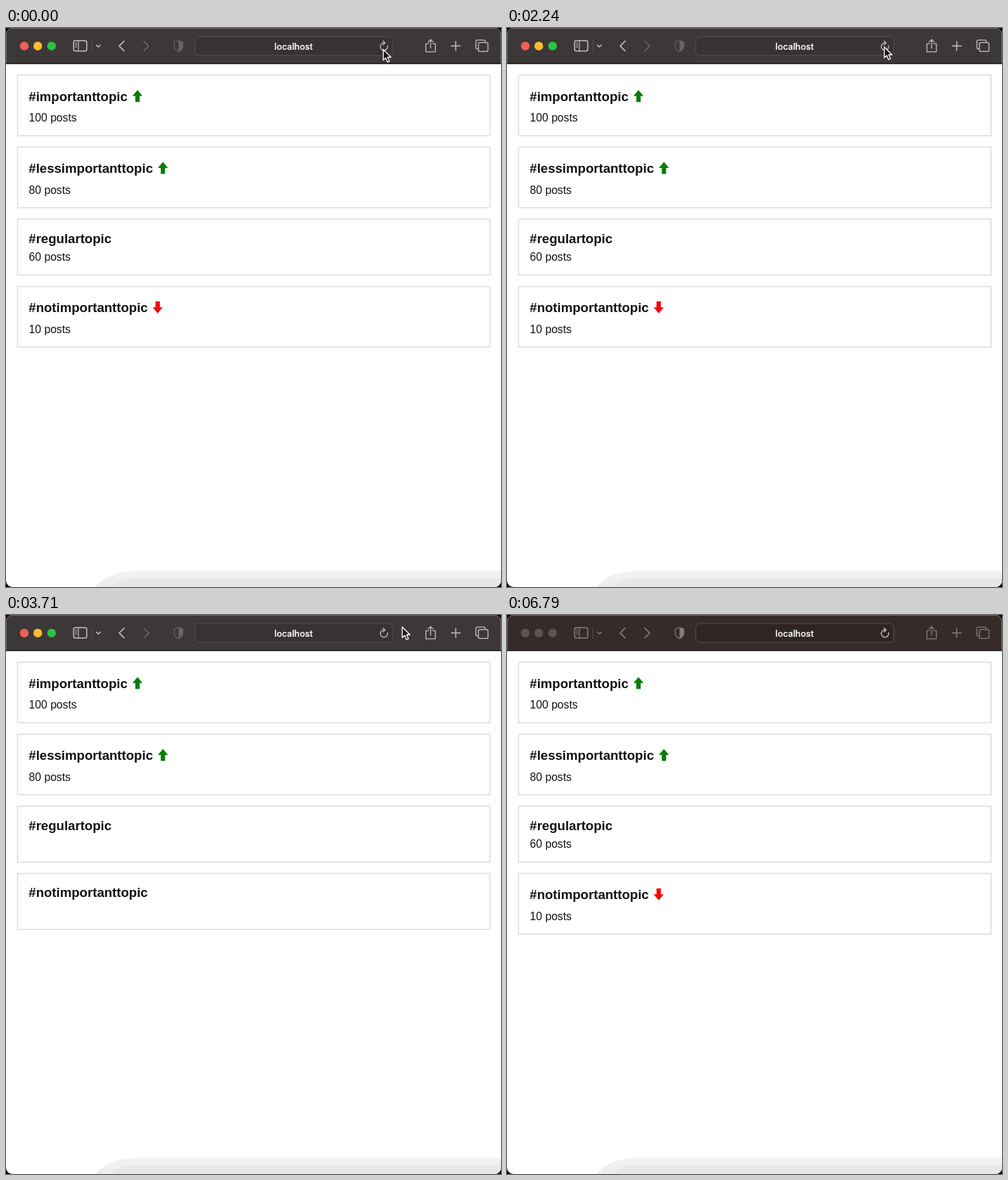
These frames come from a looping animation (704x795 px, 7.35 s). An HTML page:

```html
<!DOCTYPE html>
<html lang="en">
<head>
<meta charset="utf-8">
<title>Topics</title>
<style>
  html, body { margin: 0; width: 100%; height: 100%; overflow: hidden; background: #000; }
  svg { display: block; width: 704px; height: 795px; }
  .bar { --bar: #3c3837; --field: #373332; --edge: #55504f; --icon: #c3c0bf; --soft: #686463; --reload: #c3c0bf; }
  .bar.idle { --bar: #372b29; --field: #302523; --edge: #594e4c; --icon: #857d7b; --soft: #857d7b; --reload: #d0cbc9; }
  .bar.idle .light { fill: #5d5351; }
  .icon { fill: none; stroke: var(--icon); stroke-width: 1.5; stroke-linecap: round; stroke-linejoin: round; }
  .soft { stroke: var(--soft); }
  .url { font: 500 12.5px Inter, Roboto, sans-serif; fill: #fff; stroke: #fff; stroke-width: .2; text-anchor: middle; }
  .card rect { fill: #fff; stroke: #dadada; stroke-width: 1.4; }
  .title { font: bold 18.6px "Liberation Sans", Arial, sans-serif; fill: #111; }
  .posts { font: 15.7px "Liberation Sans", Arial, sans-serif; fill: #111; }
</style>
</head>
<body>
<svg viewBox="0 0 704 795">
  <defs>
    <clipPath id="window"><rect width="704" height="795" rx="9"/></clipPath>
    <linearGradient id="shade" x1="0" y1="0" x2="0" y2="1">
      <stop offset="0" stop-color="#f3f3f3"/>
      <stop offset="1" stop-color="#ececec"/>
    </linearGradient>
  </defs>
  <g clip-path="url(#window)">
    <rect width="704" height="795" fill="#fff"/>
    <path d="M127 795C141 779 160 772 188 772H704V795Z" fill="url(#shade)"/>
    <path d="M149 795C159 786 170 782.5 192 782.5H704V795Z" fill="#e7e7e7"/>
    <g id="list"></g>
    <g id="bar" class="bar">
      <rect width="704" height="50" fill="var(--bar)"/>
      <rect y="50" width="704" height="1.3" fill="#0c0a0a"/>
      <path d="M.5 50V9A8.5 8.5 0 0 1 9 .5H695A8.5 8.5 0 0 1 703.5 9V50" fill="none" stroke="#696564"/>
      <circle class="light" cx="26" cy="25.7" r="6.2" fill="#f05f57"/>
      <circle class="light" cx="45.2" cy="25.7" r="6.2" fill="#fdbc2e"/>
      <circle class="light" cx="64.8" cy="25.7" r="6.2" fill="#2bc440"/>
      <rect x="268.5" y="12.2" width="281.5" height="26.8" rx="6" fill="var(--field)" stroke="var(--edge)"/>
      <text class="url" x="409" y="30.7">localhost</text>
      <g class="icon">
        <rect x="96.2" y="18" width="18.6" height="14.8" rx="2.5"/>
        <path d="M103 18V32.8M98.7 21.5H100.6M98.7 24.2H100.6M98.7 26.9H100.6" stroke-width="1.2"/>
        <path d="M122.3 17V34" stroke="var(--edge)" stroke-width="1"/>
        <path d="M128.5 24.3L131.3 27L134.1 24.3"/>
        <path d="M168 18.6L161 25.6L168 32.6"/>
        <path class="soft" d="M196 18.6L203 25.6L196 32.6"/>
        <path class="soft" d="M245.4 17.8L251.5 20V26C251.5 29.5 248.5 32 245.4 33.7C242.2 32 239.2 29.5 239.2 26V20Z" stroke-width="1.2"/>
        <path d="M245.4 17.8L251.5 20V26C251.5 29.5 248.5 32 245.4 33.7Z" fill="var(--soft)" stroke="none"/>
        <path d="M542.6 25.2A5.2 5.2 0 1 1 537.6 21.2M536.2 18.6L539.1 21.3L536.2 24" stroke="var(--reload)" stroke-width="1.3"/>
        <path d="M600.8 22.3H597.2V33.8H610.6V22.3H607M603.9 28.7V16.6M600.5 19.8L603.9 16.4L607.3 19.8" stroke-width="1.3"/>
        <path d="M633.3 25.6H646M639.6 19.2V32"/>
        <path d="M671.5 29.8H670.3Q668.3 29.8 668.3 27.8V19.2Q668.3 17.2 670.3 17.2H679.6Q681.6 17.2 681.6 19.2V20.6" stroke-width="1.3"/>
        <rect x="671.8" y="20.7" width="13.7" height="12.7" rx="2.2" stroke-width="1.3"/>
      </g>
    </g>
    <path id="cursor" d="M0 0V15.2L3.5 12L6 18L8.8 16.8L6.3 11H11Z" fill="#1b1918" stroke="#fff" stroke-width="1.3" stroke-linejoin="round"/>
  </g>
</svg>
<script>
const LOOP = 7350, STEP = 70;
const RELOAD = 2450, BLUR = 6720;

// name, post count, arrow centre, arrow direction, load time
const topics = [
  ["#importanttopic", 100, 187, 1, 3640],
  ["#lessimportanttopic", 80, 223.2, 1, 2870],
  ["#regulartopic", 60, 0, 0, 4200],
  ["#notimportanttopic", 10, 215.7, -1, 4760]
];

// time, x, y of the pointer tip
const path = [
  [0, 536.5, 30.5], [350, 536.5, 30.5], [1050, 575.5, 27.5], [1190, 575.5, 27.5],
  [1820, 537, 27], [2380, 536.5, 27], [2800, 556, 19], [2940, 556, 19],
  [3290, 563.5, 17], [4760, 563.5, 17], [5180, 620, -25], [LOOP, 620, -25]
];

const byId = id => document.getElementById(id);

function add(parent, tag, attrs, text = "") {
  const el = document.createElementNS("http://www.w3.org/2000/svg", tag);
  for (const key in attrs) el.setAttribute(key, attrs[key]);
  el.textContent = text;
  return parent.appendChild(el);
}

const cards = topics.map(([name, count, x, dir, at]) => {
  const group = add(byId("list"), "g", { class: "card" });
  const box = add(group, "rect", { x: 16.4, width: 672, y: 0 });
  const title = add(group, "text", { class: "title", x: 32.3 }, name);
  const posts = add(group, "text", { class: "posts", x: 32.6 }, count + " posts");
  const arrow = dir && add(group, "path", {
    d: "M0-8.5L7.2 0H3.1V8.5H-3.1V0H-7.2Z",
    transform: `translate(${x} 29.7) scale(1 ${dir})`,
    fill: dir > 0 ? "#0a7d0a" : "#f40606"
  });
  return { group, box, title, posts, arrow, at };
});

function layout(t) {
  let y = 67;
  for (const { group, box, title, posts, arrow, at } of cards) {
    const loaded = t < RELOAD || t >= at;
    const tall = loaded && arrow;
    const height = tall ? 86.2 : 79.6;
    group.setAttribute("transform", `translate(0 ${y})`);
    box.setAttribute("height", height);
    title.setAttribute("y", tall ? 36.8 : 33.8);
    posts.setAttribute("y", tall ? 66.3 : 59.5);
    posts.style.display = loaded ? "" : "none";
    if (arrow) arrow.style.display = posts.style.display;
    y += height + 16.2;
  }
}

function pointer(t) {
  const i = path.findIndex(p => p[0] > t);
  const [t0, x0, y0] = path[i - 1], [t1, x1, y1] = path[i];
  const k = (t - t0) / (t1 - t0), e = k * k * (3 - 2 * k);
  return `translate(${x0 + (x1 - x0) * e} ${y0 + (y1 - y0) * e})`;
}

function draw(now) {
  const t = Math.floor((now - start) % LOOP / STEP) * STEP;
  layout(t);
  byId("cursor").setAttribute("transform", pointer(t));
  byId("bar").classList.toggle("idle", t >= BLUR);
}

const start = performance.now();
function tick() {
  draw(performance.now());
  requestAnimationFrame(tick);
}
tick();
</script>
</body>
</html>
```
